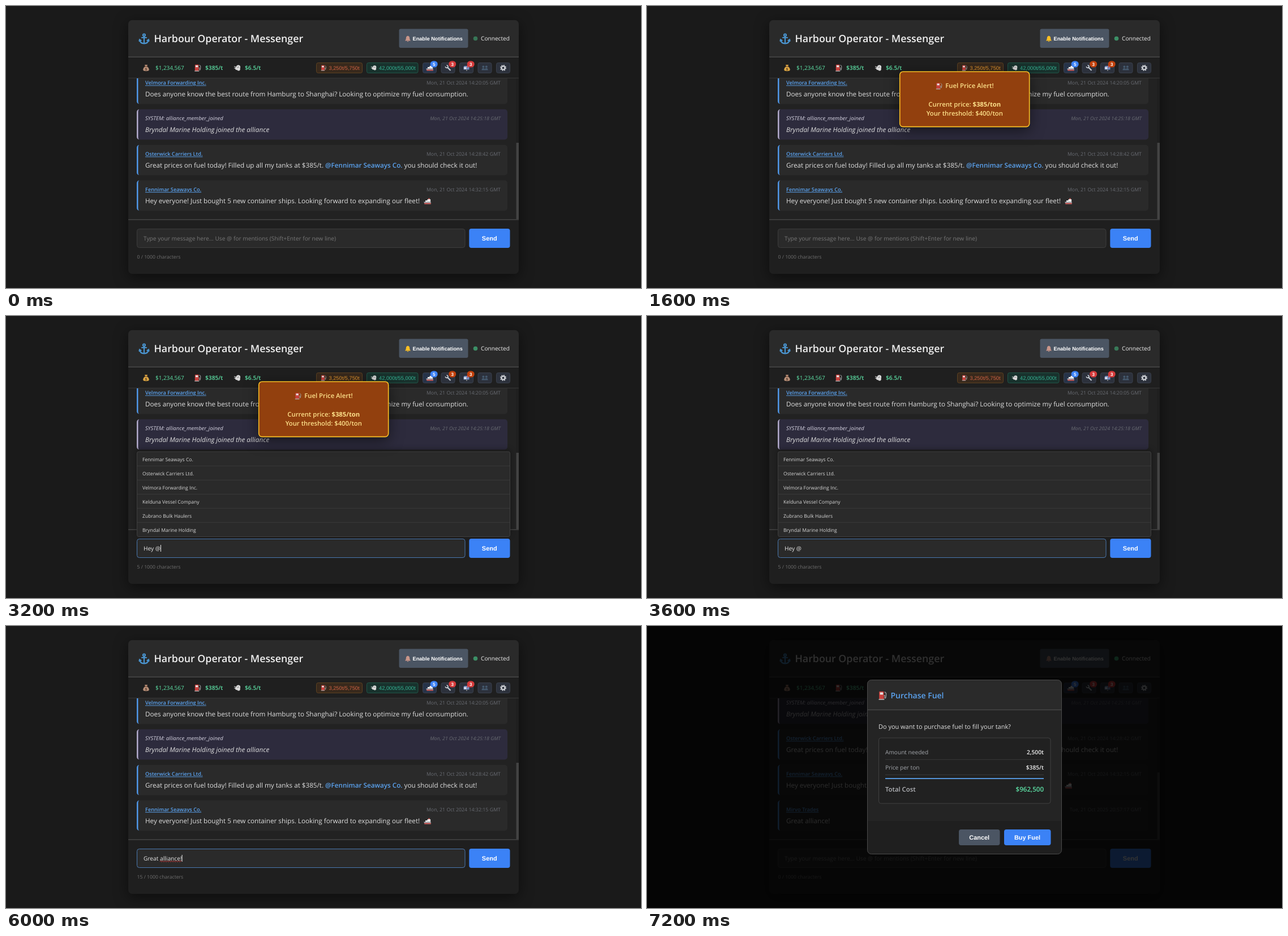
An HTML page that plays this animation: 1122x499 px, repeating every 8 s.

```html
<!DOCTYPE html>
<html lang="en">
<head>
<meta charset="utf-8">
<title>Fleet chat</title>
<style>
html, body { margin: 0; width: 100%; height: 100%; overflow: hidden; background: #1a1a1a; }
svg { display: block; width: 1122px; height: 499px; font-family: "Open Sans", "Noto Sans", sans-serif;
  text-rendering: geometricPrecision;
  --pill: #cf6243; --badge: #d63b3b; --bell: #c9968a; --bag: #b58d76; }
svg.warm { --pill: #e8982e; --badge: #c2410c; --bell: #fbbf24; --bag: #d9a441; }
text { white-space: pre; }
.ui { font-family: "Liberation Sans", Arial, sans-serif; }
.medium { font-weight: 500; }
.semi { font-weight: 600; }
.bold { font-weight: 700; }
.mid { text-anchor: middle; }
.end { text-anchor: end; }
.it { font-style: italic; }
.link { font-weight: 600; text-decoration: underline; }
.shadow { filter: drop-shadow(0 6px 12px rgba(0,0,0,.5)); }
.lift { filter: drop-shadow(0 -3px 5px rgba(0,0,0,.35)); }
</style>
</head>
<body>
<svg id="stage" viewBox="0 0 1122 499">
<defs>
  <clipPath id="list"><rect x="216" y="128" width="690" height="249"/></clipPath>
  <g id="anchor" fill="none" stroke="#4a94cf" stroke-width="2.2" stroke-linecap="round">
    <circle cy="-6.5" r="2"/><path d="M0-4.5V8M-4-2H4M-8 2Q-7 8 0 8.5Q7 8 8 2M-8.5 4L-8 1.5L-5.5 3M8.5 4L8 1.5L5.5 3"/>
  </g>
  <g id="bag">
    <path d="M-2.5-5.5H2.5L1.5-2.6Q5.5 0 5.3 3.6Q5 5.8 0 5.8Q-5 5.8-5.3 3.6Q-5.5 0-1.5-2.6Z" fill="var(--bag)"/>
    <path d="M-2-2.6H2" stroke="#7a4b35" stroke-width="1.2"/>
    <text class="mid bold" y="4.2" font-size="6" fill="#4b3428">$</text>
  </g>
  <g id="pump">
    <rect x="-4.5" y="-5.5" width="6.5" height="11" rx="1" fill="#c9413d"/>
    <rect x="-3.3" y="-4.2" width="4.1" height="3" fill="#e4e4e4"/>
    <rect x="-5" y="4.6" width="7.6" height="1.4" fill="#a9a9a9"/>
    <path d="M2 0H3.2V3.5Q4.8 4.5 5-.5V-3L3-5" fill="none" stroke="#a0a0a0" stroke-width="1"/>
  </g>
  <g id="cloud" fill="#dcdcdc">
    <circle cx="1.5" cy="-1.5" r="3.6"/><circle cx="-1.2" cy="1" r="2.8"/><circle cx="2" cy="2.2" r="2.8"/>
    <path d="M-6-2.5L-2-1.5M-6 .5L-3 .5" stroke="#dcdcdc"/><path d="M-1 0Q1-3 3-1" fill="none" stroke="#777"/>
  </g>
  <path id="bell" d="M0-5.2Q3-4.6 3.2-1L3.6 1.6L5 3.4H-5L-3.6 1.6L-3.2-1Q-3-4.6 0-5.2ZM-1.5 4H1.5L0 5.4Z" fill="var(--bell)"/>
  <g id="ship">
    <path d="M-6.200 1H6.200V5H-5Z" fill="#a9b2ba"/><path d="M-5.600 3H6.200V5H-5Z" fill="#c0433f"/>
    <path d="M-3.500 1V-1.500H0V-3.500H5.600V1Z" fill="#f1f1f1"/><path d="M1.500-3.500V-5.200H4.500V-3.500Z" fill="#c25a55"/>
  </g>
  <g id="wrench" fill="none" stroke="#c6ccd2" stroke-width="2.2">
    <path d="M-1.5-1.5L4.5 4.5"/><path d="M-4.6-2.4A2.3 2.3 0 1 0-2.4-4.6" stroke-width="1.7"/>
  </g>
  <g id="mail">
    <path d="M-5 3V-1Q-5-3.6-2.6-3.6H3Q5-3.6 5-1V3Z" fill="#7590c4"/><rect x="-4.2" y="-1.4" width="4" height="3.6" fill="#dfe4ee"/>
    <path d="M2 0V-4.6H4.4" stroke="#cf4b48" stroke-width="1.3" fill="none"/><path d="M.5 3V5.5" stroke="#8a8a8a" stroke-width="1.6"/>
  </g>
  <g id="people" fill="#44586c">
    <circle cx="-2.6" cy="-2" r="2"/><path d="M-5.6 4Q-5.4.6-2.6.6Q0 .6.2 4Z"/>
    <circle cx="2.8" cy="-2" r="2"/><path d="M-.2 4Q0 .6 2.8.6Q5.4.6 5.6 4Z"/>
  </g>
  <g id="gear" fill="none" stroke="#d0d3d8">
    <circle r="3" stroke-width="2"/><circle r="4.6" stroke-width="1.8" stroke-dasharray="1.8 1.81"/>
  </g>
</defs>
</svg>
<script>
const STEP = 400, LOOP = 8000;
const BLUE = '#3b82f6', SKY = '#5ba3f0', GREEN = '#5de0a5';
const firms = ['Fennimar Seaways Co.', 'Osterwick Carriers Ltd.', 'Velmora Forwarding Inc.',
  'Kelduna Vessel Company', 'Zubrano Bulk Haulers', 'Bryndal Marine Holding'];

const text = (x, y, size, fill, str, cls = '', id = '') =>
  `<text x="${x}" y="${y}" font-size="${size}" fill="${fill}" class="${cls}" id="${id}">${str}</text>`;
const box = (x, y, w, h, fill, r = 0, stroke = 'none', more = '') =>
  `<rect x="${x}" y="${y}" width="${w}" height="${h}" rx="${r}" fill="${fill}" stroke="${stroke}" ${more}/>`;
const icon = (name, x, y, scale = 1) =>
  `<use href="#${name}" transform="translate(${x} ${y}) scale(${scale})"/>`;
const rule = (x1, x2, y, color, w = 1) =>
  `<path d="M${x1} ${y}H${x2}" stroke="${color}" stroke-width="${w}"/>`;

function card(y, name, date, body, system) {
  const cls = system ? 'it' : '';
  return `<g transform="translate(231 ${y})">` + box(0, 0, 655, 53.6, system ? '#2d2b3d' : '#2a2a2a', 5)
    + `<path d="M5 0A5 5 0 0 0 0 5V48.6A5 5 0 0 0 5 53.6A2.5 5 0 0 1 2.5 48.6V5A2.5 5 0 0 1 5 0Z" fill="${system ? '#b3abcb' : '#4f97e8'}"/>`
    + text(15, 19.6, system ? 9.5 : 9.2, system ? '#d4d2e0' : SKY, name, system ? 'it' : 'link')
    + text(643, 19, 8.83, '#686b72', date + ' GMT', 'end ' + cls)
    + text(15, 40.2, 11.68, '#dedede', body, cls) + '</g>';
}

function toolButton(x, name, count, color) {
  return box(x + .5, 100.5, 24, 18, name === 'ship' ? '#263349' : '#2c313c', 3, '#3b414d')
    + icon(name, x + 12.5, 109.5)
    + (count ? box(x + 13.7, 97.2, 13, 11.4, color, 5.7) + text(x + 20.2, 106, 8, '#fff', count, 'ui bold mid') : '');
}

const header = box(216, 25, 690, 449, '#1f1f1f', 7, 'none', 'class="shadow"')
  + '<path d="M216 90V32a7 7 0 0 1 7-7H899a7 7 0 0 1 7 7V90Z" fill="#2a2a2a"/>' + rule(216, 906, 90.3, '#484848', 1.5)
  + icon('anchor', 244, 58) + text(261.5, 64.4, 17.8, '#f0f0f0', 'Harbour Operator - Messenger', 'semi')
  + box(694.5, 40.5, 122, 33.5, '#4b5563', 3) + icon('bell', 710, 58)
  + text(718.5, 61, 9.2, '#fff', 'Enable Notifications', 'ui bold')
  + '<circle id="dot" cx="829.5" cy="57.5" r="3.8" fill="#4ade94"/>'
  + text(839, 61.3, 10.15, '#eee', 'Connected');

const statusBar = icon('bag', 247.5, 109.5) + text(264, 113, 10, GREEN, '$1,234,567', 'medium')
  + icon('pump', 338.5, 109.5, 1.05) + text(352, 113, 10.2, GREEN, '$385/t', 'semi')
  + icon('cloud', 409, 109.5) + text(422, 113, 10.2, GREEN, '$6.5/t', 'semi')
  + box(548.5, 100.5, 81, 18, '#38291c', 3, '#5d4222') + icon('pump', 561, 109.5, .85)
  + text(570.5, 112.5, 9.25, 'var(--pill)', '3,250t/5,750t', 'ui')
  + box(637.5, 100.5, 90.5, 18, '#18322d', 3, '#215648') + icon('cloud', 650, 109.5, .85)
  + text(659, 112.5, 9.3, '#35b293', '42,000t/55,000t', 'ui')
  + toolButton(736, 'ship', 5, BLUE) + toolButton(768.5, 'wrench', 3, 'var(--badge)')
  + toolButton(801, 'mail', 3, 'var(--badge)') + toolButton(833.5, 'people') + toolButton(866, 'gear')
  + rule(216, 906, 127.5, '#363636');

const messages = box(216, 128, 690, 249, '#222') + box(901, 128, 5, 249, '#1f1f1f')
  + '<g clip-path="url(#list)"><g id="cards">'
  + card(119.8, firms[2], 'Mon, 21 Oct 2024 14:20:05', 'Does anyone know the best route from Hamburg to Shanghai? Looking to optimize my fuel consumption.')
  + card(182.8, 'SYSTEM: alliance_member_joined', 'Mon, 21 Oct 2024 14:25:18', firms[5] + ' joined the alliance', true)
  + card(245.8, firms[1], 'Mon, 21 Oct 2024 14:28:42', `Great prices on fuel today! Filled up all my tanks at $385/t. <tspan class="semi" fill="${SKY}">@${firms[0]}</tspan> you should check it out!`)
  + card(308.6, firms[0], 'Mon, 21 Oct 2024 14:32:15', 'Hey everyone! Just bought 5 new container ships. Looking forward to expanding our fleet!')
  + icon('ship', 744.5, 345.5)
  + '<g id="newCard">' + card(371.6, 'Mirvo Trades', 'Tue, 21 Oct 2025 20:57:17', 'Great alliance!') + '</g>'
  + '</g></g>' + box(901.5, 242, 4.5, 135, '#434343', 0, 'none', 'id="thumb"') + rule(216, 906, 378, '#444', 1.5);

const composer = box(231.5, 394.5, 579.5, 33, '#2a2a2a', 4, '#3c3c3c', 'id="field"')
  + text(243, 414.8, 10.2, '#e6e6e6', '', '', 'typed') + '<path id="caret" stroke="#eee"/>'
  + `<path id="squiggle" d="M272 416.5q1-2 2 0${'t2 0'.repeat(18)}" fill="none" stroke="#d94040"/>`
  + box(818.3, 394, 72.2, 34, BLUE, 4, 'none', 'id="send"') + text(854.3, 415, 11, '#fff', 'Send', 'ui bold mid')
  + text(231.5, 447, 8.66, '#707070', '', '', 'count');

const mentions = '<g id="mentions">' + box(231.5, 240, 659, 150.5, '#2a2a2a', 3, '#3f3f3f', 'class="lift"')
  + firms.map((name, i) => text(241, 256.6 + 25 * i, 8.6, '#d6d6d6', name)
    + (i ? rule(232, 890, 240.3 + 25 * i, '#3a3a3a') : '')).join('') + '</g>';

const alertToast = '<g id="alert">' + box(-114.6, -48.8, 229, 97.4, '#92400e', 5.5, '#fbbf24', 'stroke-width="1.6" class="shadow"')
  + icon('pump', -45.5, -23.5)
  + text(-34, -19.8, 11.3, '#fde08a', 'Fuel Price Alert!', 'semi')
  + text(0, 12.8, 11.3, '#fde08a', 'Current price: <tspan class="bold">$385/ton</tspan>', 'semi mid')
  + text(0, 29, 11.3, '#fde08a', 'Your threshold: $400/ton', 'semi mid') + '</g>';

const sentToast = '<g id="sent">' + box(446.7, 141, 229, 48, '#065f46', 5.5, '#4ade80', 'stroke-width="1.6" class="shadow"')
  + text(561, 170, 11.3, '#86efac', 'Message sent successfully!', 'semi mid') + '</g>';

const modal = '<g id="modal">' + box(0, 0, 1122, 499, '#000', 0, 'none', 'opacity=".8"')
  + box(389.5, 95.5, 343, 308, '#242424', 7)
  + '<path d="M389.5 148V102.5a7 7 0 0 1 7-7H725.5a7 7 0 0 1 7 7V148Z" fill="#2a2a2a"/>'
  + '<path d="M389.5 345V396.5a7 7 0 0 0 7 7H725.5a7 7 0 0 0 7-7V345Z" fill="#1f1f1f"/>'
  + box(389.5, 95.5, 343, 308, 'none', 7, '#4a4a4a') + rule(390, 732, 148.3, '#4a4a4a', 1.3)
  + icon('pump', 416, 123, 1.3) + text(430.5, 127.8, 14, SKY, 'Purchase Fuel', 'semi')
  + text(409, 181.5, 10.94, '#e0e0e0', 'Do you want to purchase fuel to fill your tank?')
  + box(409.5, 198, 303.5, 116, '#212121', 4, '#404040')
  + text(421, 227.2, 10.15, '#a3a6ab', 'Amount needed') + text(701, 227.2, 10.2, '#f0f0f0', '2,500t', 'semi end')
  + rule(421, 701, 236.3, '#3a3a3a')
  + text(421, 254, 10.15, '#a3a6ab', 'Price per ton') + text(701, 254, 10.2, '#f0f0f0', '$385/t', 'semi end')
  + rule(421, 701, 263.2, '#3a3a3a') + rule(421, 701, 269.8, SKY, 1.7)
  + text(421, 292.8, 11.3, '#b4b6ba', 'Total Cost', 'semi') + text(701, 292.8, 11.6, GREEN, '$962,500', 'semi end')
  + box(551, 360, 72.5, 28, '#4b5563', 4) + text(587.2, 377.7, 10.9, '#fff', 'Cancel', 'ui bold mid')
  + box(631, 360, 82.5, 28, BLUE, 4) + text(672, 377.7, 10.9, '#fff', 'Buy Fuel', 'ui bold mid') + '</g>';

const stage = document.getElementById('stage');
stage.insertAdjacentHTML('beforeend',
  header + statusBar + messages + composer + mentions + alertToast + sentToast + modal);
const $ = id => document.getElementById(id);
const show = (id, on) => $(id).setAttribute('display', on ? 'inline' : 'none');
const set = (id, attrs) => { for (const k in attrs) $(id).setAttribute(k, attrs[k]); };

// cubic-bezier(.68, -.55, .265, 1.55)
function backInOut(x) {
  if (x >= 1) return 1;
  const curve = (s, a, b) => 3 * (1 - s) ** 2 * s * a + 3 * (1 - s) * s * s * b + s ** 3;
  let lo = 0, hi = 1;
  for (let i = 0; i < 20; i++) {
    const m = (lo + hi) / 2;
    if (curve(m, .68, .265) < x) lo = m; else hi = m;
  }
  return curve(lo, -.55, 1.55);
}

function typedAt(t) {
  if (t < 2400 || t >= 6400) return '';
  if (t < 4400) return 'Hey @'.slice(0, 1 + (t - 2400) / 80);
  if (t < 4800) return `Hey @${firms[0]} `;
  return 'Great alliance!'.slice(0, (t - 4400) / 80);
}

function render(now) {
  const t = Math.floor(now % LOOP / STEP) * STEP;
  const typed = typedAt(t), sent = t >= 6400, alerting = t >= 800 && t < 3600;

  stage.classList.toggle('warm', alerting);
  set('dot', { opacity: .42 + .58 * ((1 + Math.cos((t - 2400) / 4400 * 2 * Math.PI)) / 2) ** 4 });

  show('alert', alerting);
  const p = backInOut((t - 410) / 500);
  if (alerting) set('alert', { transform: `translate(561.3 165) rotate(${360 * p}) scale(${p})` });

  show('newCard', sent);
  set('cards', { transform: `translate(0 ${sent ? -63 : 0})` });
  set('thumb', sent ? { y: 259, height: 118 } : { y: 242, height: 135 });

  $('typed').textContent = typed || 'Type your message here... Use @ for mentions (Shift+Enter for new line)';
  set('typed', { fill: typed ? '#e6e6e6' : '#777' });
  set('field', { stroke: typed ? '#4a78b0' : '#3c3c3c' });
  $('count').textContent = `${typed.length} / 1000 characters`;
  show('caret', typed && t % 1000 < 500);
  if (typed) set('caret', { d: `M${243.5 + $('typed').getComputedTextLength()} 405v12` });
  show('squiggle', typed.length === 15);
  show('mentions', t >= 2800 && t < 4400);

  set('send', { fill: sent && t < 7200 ? '#2563eb' : BLUE });
  show('sent', sent && t < 7200);
  show('modal', t >= 7200);
  requestAnimationFrame(render);
}
requestAnimationFrame(render);
</script>
</body>
</html>
```
